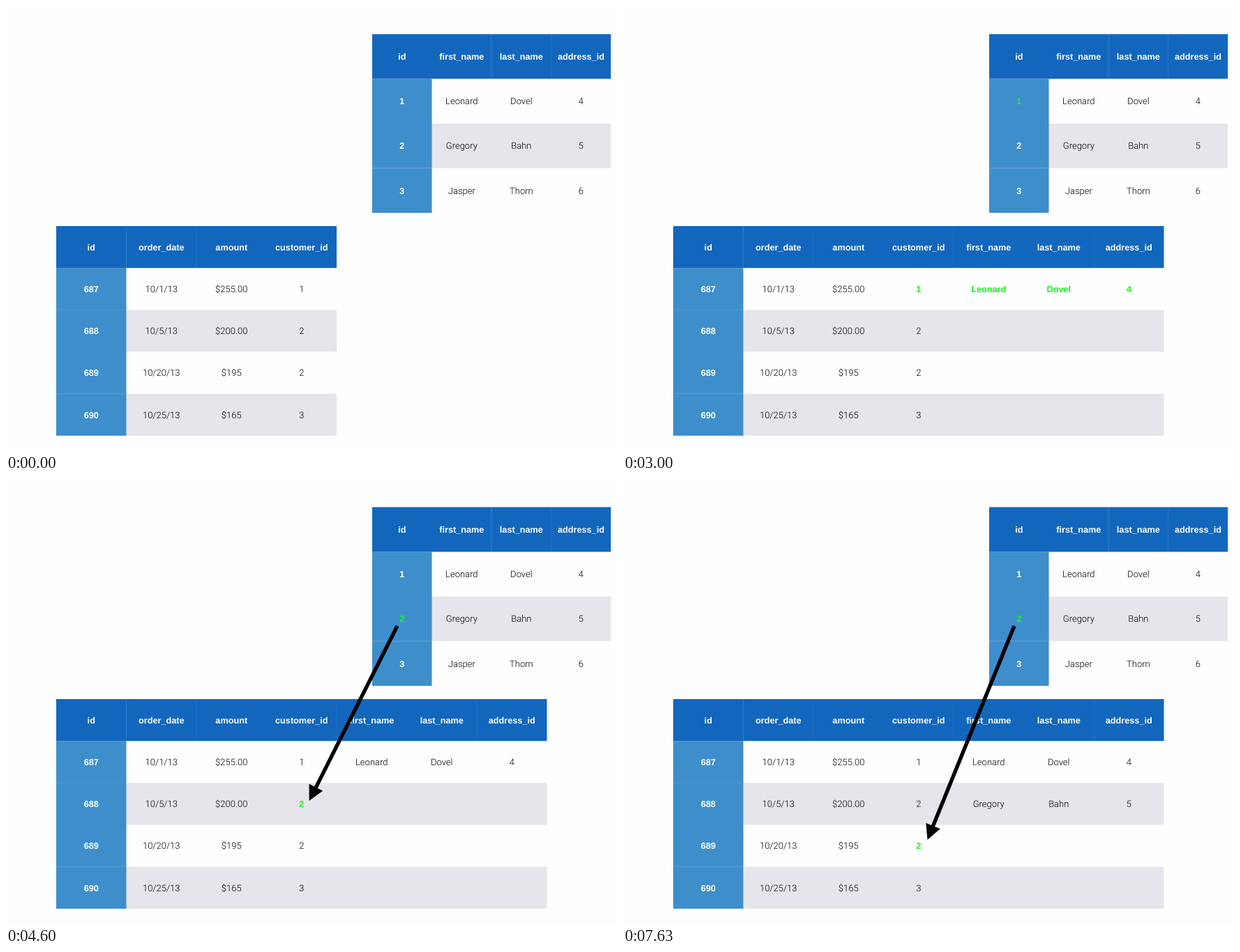
An HTML page for the animation above (8000 ms loop, 876 by 639 pixels).

```html
<!DOCTYPE html>
<html lang="en">
<head>
<meta charset="utf-8">
<title>Table join</title>
<style>
  html, body { margin: 0; height: 100%; overflow: hidden; background: #fefefe; }
  svg { display: block; width: 100%; height: 100%; }
  text { font: 300 13px Roboto, "Liberation Sans", sans-serif; text-anchor: middle; text-rendering: geometricPrecision; }
  .bold { font: bold 12.7px "Liberation Sans", Arial, sans-serif; fill: #fff; }
  .match { fill: #14f71e; }
  .scene { visibility: hidden; animation: 8s step-end infinite; }
</style>
</head>
<body>
<svg id="stage" viewBox="0 0 876 639"></svg>
<script>
const LOOP = 8000;
const HEADER = "#1267bd", KEY = "#3f8ecc", STRIPE = "#e6e5eb";

const personColumns = ["first_name", "last_name", "address_id"];
const customers = [
  [1, "Leonard", "Dovel", 4],
  [2, "Gregory", "Bahn", 5],
  [3, "Jasper", "Thorn", 6],
];
const orders = [
  [687, "10/1/13", "$255.00", 1],
  [688, "10/5/13", "$200.00", 2],
  [689, "10/20/13", "$195", 2],
  [690, "10/25/13", "$165", 3],
];

// customer / order: highlighted rows; joined: order rows already filled in
const scenes = [
  { start: 0 },
  { start: 1300, customer: 0, order: 0, arrow: [559, 148, 437, 392] },
  { start: 3000, customer: 0, order: 0, wide: true, joined: 1 },
  { start: 4600, customer: 1, order: 1, wide: true, joined: 1, arrow: [561, 211, 434.7, 462] },
  { start: 6130, customer: 1, order: 1, wide: true, joined: 2 },
  { start: 7630, customer: 1, order: 2, wide: true, joined: 2, arrow: [561, 211, 436.5, 518] },
];

const rect = (x, y, w, h, fill, opacity = 1) =>
  `<rect x="${x}" y="${y}" width="${w}" height="${h}" fill="${fill}" opacity="${opacity}"/>`;

function table({ x, y, cw, rh, head, rows, isMatch, columnLines, rowLines }) {
  const width = cw * head.length;
  const label = (value, col, row, style = "") =>
    `<text class="${style}" x="${x + cw * (col + .5)}" y="${y + rh * (row + .5) + 4.6}">${value}</text>`;

  let out = rows.map((_, r) => r % 2 ? rect(x, y + rh * (r + 1), width, rh, STRIPE) : "").join("");
  out += rect(x, y + rh, cw, rh * rows.length, KEY) + rect(x, y, width, rh, HEADER);
  for (const [col, opacity] of columnLines)
    if (col < head.length) out += rect(x + cw * col - .5, y, 1, rh, "#fff", opacity);
  for (const [row, opacity] of rowLines)
    out += rect(x, y + rh * row - .5, cw, 1, "#fff", opacity);

  out += head.map((name, c) => label(name, c, 0, "bold")).join("");
  rows.forEach((cells, r) => cells.forEach((value, c) => {
    const style = isMatch(r, c) ? "bold match" : c === 0 ? "bold" : "";
    out += label(value, c, r + 1, style);
  }));
  return out;
}

function arrow([x1, y1, x2, y2]) {
  const length = Math.hypot(x2 - x1, y2 - y1);
  const angle = Math.atan2(y2 - y1, x2 - x1) * 180 / Math.PI;
  return `<g transform="translate(${x1} ${y1}) rotate(${angle})">
    <path d="M0-2.7H${length - 20}V2.7H0Z"/>
    <path d="M${length} 0l-21.5-11v22z"/></g>`;
}

function drawScene(s) {
  const people = table({
    x: 525, y: 40.4, cw: 85.55, rh: 64.15,
    head: ["id", ...personColumns], rows: customers,
    isMatch: (r, c) => c === 0 && r === s.customer,
    columnLines: [[2, .18], [3, .08]], rowLines: [[3, .2]],
  });
  const sales = table({
    x: 72, y: 316, cw: 100.5, rh: 60.2,
    head: ["id", "order_date", "amount", "customer_id", ...(s.wide ? personColumns : [])],
    rows: orders.map((o, r) => r < s.joined ? [...o, ...customers[o[3] - 1].slice(1)] : o),
    isMatch: (r, c) => c >= 3 && r === s.order,
    columnLines: [[1, .14], [2, .07], [4, .05], [6, .07]], rowLines: [[2, .06], [4, .15]],
  });
  return people + sales + (s.arrow ? arrow(s.arrow) : "");
}

const keyframes = scenes.map(({ start }, i) => {
  const end = i + 1 < scenes.length ? scenes[i + 1].start : LOOP;
  const at = (ms, state) => `${ms / LOOP * 100}% { visibility: ${state}; }`;
  return `@keyframes scene${i} { ${start ? at(0, "hidden") : ""} ${at(start, "visible")} ${
    end < LOOP ? at(end, "hidden") + at(LOOP, "hidden") : at(LOOP, "visible")} }`;
});

document.head.insertAdjacentHTML("beforeend", `<style>${keyframes.join("\n")}</style>`);
document.getElementById("stage").innerHTML = scenes.map((s, i) =>
  `<g class="scene" style="animation-name: scene${i}">${drawScene(s)}</g>`).join("");
</script>
</body>
</html>
```
